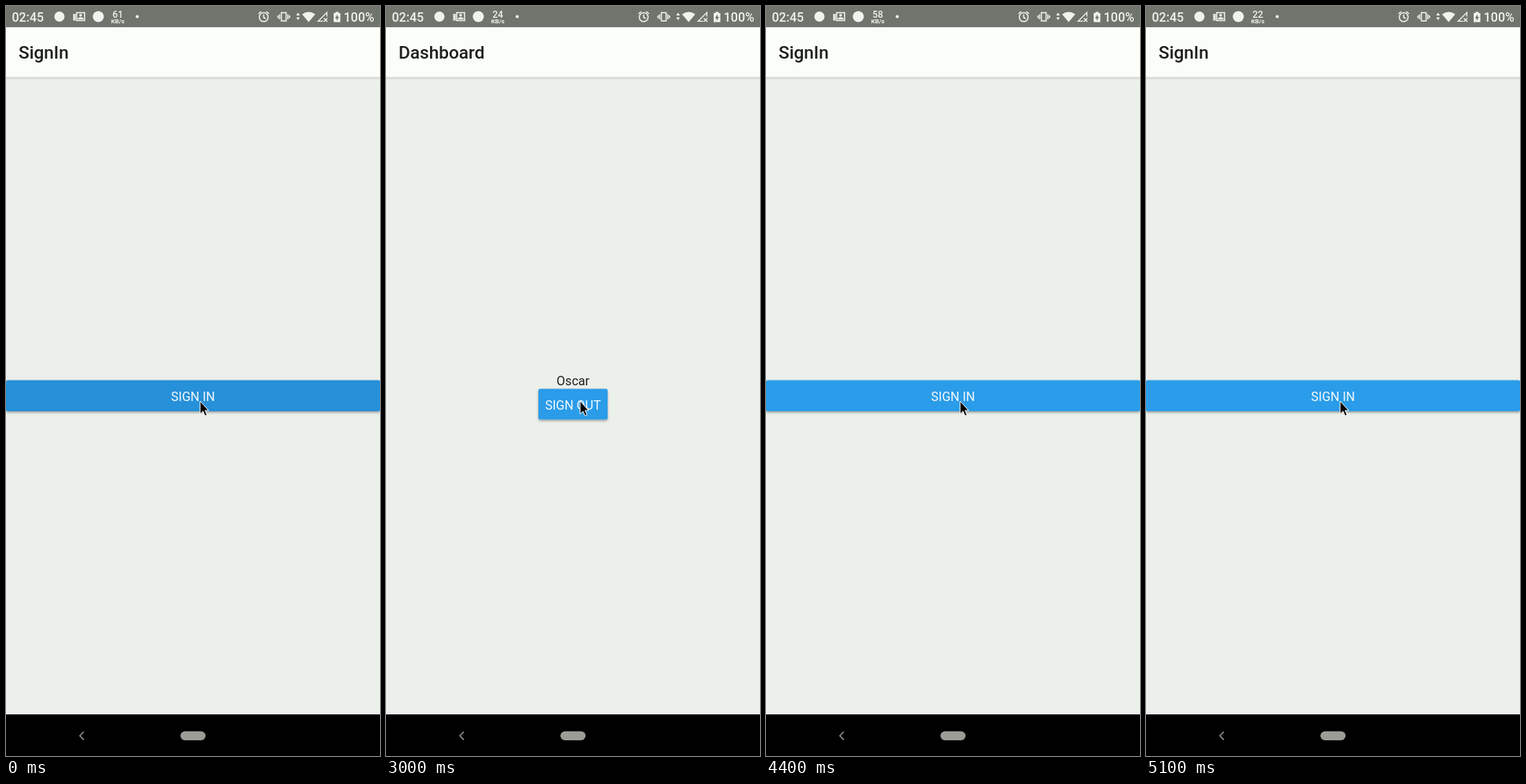
Animation, 476 px wide and 955 px high, one loop 6000 ms. Source, as an HTML page:

```html
<!DOCTYPE html>
<html lang="en">
<head>
<meta charset="utf-8">
<title>Sign in</title>
<style>
  html, body { margin: 0; width: 100%; height: 100%; overflow: hidden; background: #ecf0eb; }
  svg { display: block; }
  text { font: 400 16px Roboto, sans-serif; }
  .title { font-size: 22.6px; font-weight: 500; fill: #1c1e1b; }
  .label { fill: #f6fafd; text-anchor: middle; }
  .name { fill: #1c1e1b; text-anchor: middle; }
  .status { fill: #f0f2ee; }
  .status text { font-weight: 500; }
  .status .rate text { font-size: 12px; text-anchor: middle; }
  .status .unit { font-size: 8px; font-weight: 700; text-anchor: middle; }
  .line { fill: none; stroke: #f0f2ee; stroke-width: 1.5; }
  .button { fill: #299ce9; }

  .signin, .dashboard, .drop, .half-drop, .rate, .signin .button, .dashboard .button {
    animation: 6s step-end infinite;
  }
  .signin { animation-name: signin; }
  .dashboard { animation-name: dashboard; }
  .drop { animation-name: drop; }
  .half-drop { animation-name: half-drop; }
  .rate { animation-name: rate; }
  .signin .button { animation-name: release; }
  .dashboard .button { animation-name: press; }

  @keyframes signin {
    0%, 73.333% { opacity: 1; }
    50% { opacity: 0; }
  }
  @keyframes dashboard {
    0%, 73.333% { opacity: 0; }
    50% { opacity: 1; }
  }
  @keyframes drop {
    0%, 76.667% { transform: none; }
    75% { transform: translateY(27px); }
  }
  @keyframes half-drop {
    0%, 76.667% { transform: none; }
    75% { transform: translateY(13.5px); }
  }
  @keyframes release {
    0% { fill: #2790d9; }
    11.667% { fill: #2896e1; }
    15% { fill: #299ce9; }
  }
  @keyframes press {
    0%, 71.667% { fill: #299ce9; }
    70% { fill: #2896e1; }
  }
  @keyframes rate {
    0% { transform: none; }
    15% { transform: translateY(-30px); }
    33.333% { transform: translateY(-60px); }
    50% { transform: translateY(-90px); }
    66.667% { transform: translateY(-120px); }
    85% { transform: translateY(-150px); }
  }
</style>
</head>
<body>
<svg width="476" height="955" viewBox="0 0 476 955">
  <defs>
    <filter id="shadow" x="-10%" y="-30%" width="120%" height="170%">
      <feDropShadow dx="0" dy="1.5" stdDeviation="1.6" flood-color="#000" flood-opacity=".38"/>
    </filter>
    <linearGradient id="edge" x2="0" y2="1">
      <stop offset="0" stop-color="#cdd1cc"/>
      <stop offset="1" stop-color="#ecf0eb"/>
    </linearGradient>
  </defs>

  <rect width="476" height="955" fill="#ecf0eb"/>

  <g class="drop">
    <rect width="476" height="91" fill="#fbfdf8"/>
    <rect y="90.5" width="476" height="4" fill="url(#edge)"/>
  </g>

  <g class="signin">
    <g class="drop"><text class="title" x="16" y="67">SignIn</text></g>
    <g class="half-drop">
      <rect class="button" y="476.5" width="476" height="39.5" rx="2" filter="url(#shadow)"/>
      <text class="label" x="238" y="502.5">SIGN IN</text>
    </g>
  </g>

  <g class="dashboard">
    <text class="title" x="16" y="67">Dashboard</text>
    <text class="name" x="238" y="483">Oscar</text>
    <rect class="button" x="194" y="487.5" width="88" height="39" rx="2" filter="url(#shadow)"/>
    <text class="label" x="238" y="513.5">SIGN OUT</text>
  </g>

  <path d="M247 503V519.5L250.7 516L253.3 521.8L255.9 520.7L253.4 515H258Z"
        fill="#000" stroke="#fff" stroke-width="1"/>

  <svg class="status" width="476" height="27">
    <rect width="476" height="27" fill="#6f746d"/>
    <text x="7.5" y="20">02:45</text>
    <circle cx="68" cy="13.5" r="6.5"/>
    <!-- cards -->
    <path d="M90 8.5H100V18.5H90ZM88 10V18.5M86.3 10V18.5" class="line" stroke-width="1.2"/>
    <path d="M91.5 17V15.5Q95 13 98.5 15.5V17Z"/>
    <circle cx="95" cy="11.8" r="1.8"/>
    <circle cx="117.5" cy="13.5" r="7"/>
    <svg x="130" width="26" height="15.5">
      <g class="rate">
        <text x="12.3" y="14.5">61</text>
        <text x="12.3" y="44.5">43</text>
        <text x="12.3" y="74.5">57</text>
        <text x="12.3" y="104.5">24</text>
        <text x="12.3" y="134.5">58</text>
        <text x="12.3" y="164.5">22</text>
      </g>
    </svg>
    <text class="unit" x="142.3" y="22">KB/s</text>
    <circle cx="167" cy="13.5" r="2"/>
    <!-- alarm -->
    <g class="line">
      <circle cx="328" cy="14.2" r="5.6"/>
      <path d="M328 10.8V14.5L330.5 16M321.3 10L324.8 7M334.7 10L331.2 7"/>
    </g>
    <!-- vibrate -->
    <path class="line" d="M350.5 8.5H356.5V19H350.5ZM348.3 10.5V17M358.7 10.5V17M346.2 12V15.5M360.8 12V15.5"/>
    <path d="M369.3 12L371.7 8.5L374.1 12ZM369.3 14.5L371.7 18L374.1 14.5Z"/>
    <path d="M376.8 10.6Q385.2 4.2 393.6 10.6L385.2 20.5Z"/>
    <!-- signal -->
    <path class="line" d="M403.5 19.3H397.3L408.4 8.3V13.5M404.5 15.5L409 20M409 15.5L404.5 20" style="stroke-width:1.3"/>
    <path d="M419.3 7.5H423.3V9H425.5V20.5H417V9H419.3Z"/>
    <path d="M422 10.5L418.7 15.7H420.8V19L424 13.8H422Z" fill="#6f746d"/>
    <text x="429.7" y="20">100%</text>
  </svg>

  <rect y="902" width="476" height="53"/>
  <path d="M99 924L94 929.2L99 934.4" fill="none" stroke="#8b8e88" stroke-width="1.6"/>
  <rect x="222" y="923.5" width="32" height="11.5" rx="5.75" fill="#9a9e97"/>
</svg>
</body>
</html>
```
